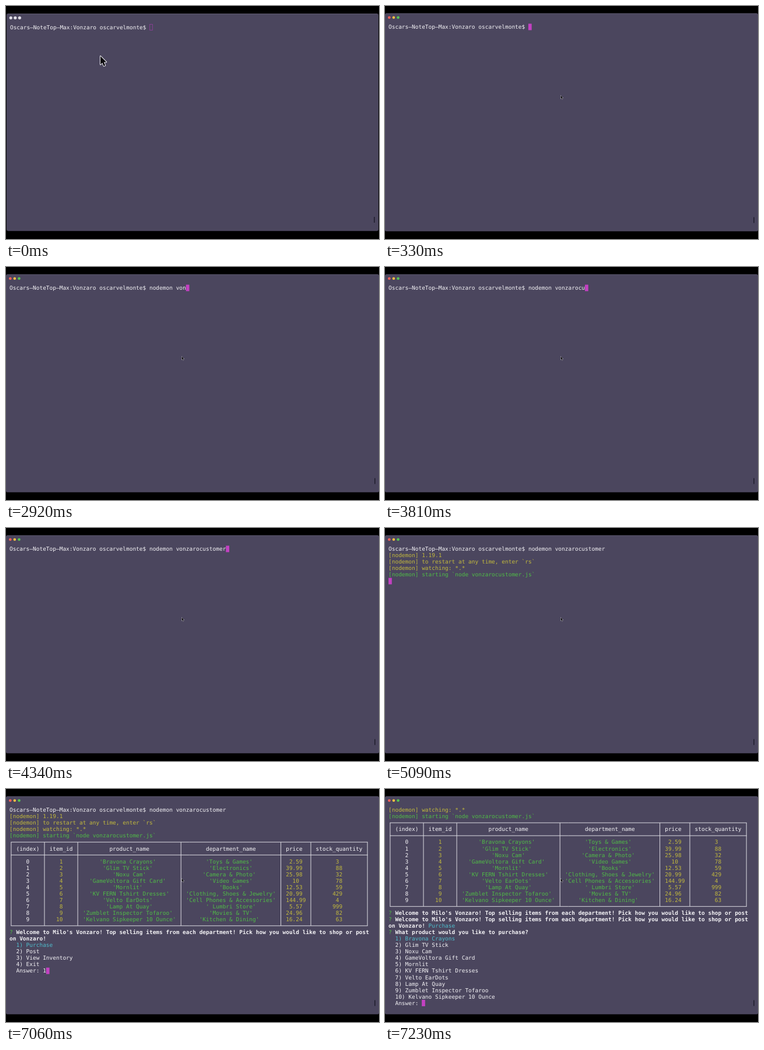
Recreate the animation shown at these times as an HTML page with a canvas. Size 640 by 400 pixels, loop 8000 ms.

```html
<!DOCTYPE html>
<html lang="en">
<head>
<meta charset="utf-8">
<title>Terminal shop</title>
<style>
html, body { margin: 0; width: 100%; height: 100%; overflow: hidden; background: #000; }
canvas { display: block; width: 640px; height: 400px; }
</style>
</head>
<body>
<canvas id="stage" width="640" height="400"></canvas>
<script>
const ctx = document.getElementById('stage').getContext('2d');
const LOOP = 8000;
const FONT = '9.49px "DejaVu Sans Mono", monospace';
const CELL = { x: 6, y: 30.4, w: 5.713, h: 11.05, base: 8.8 };
const C = {
  back: '#4b465e', white: '#f4f3f6', yellow: '#c2b93d', green: '#50bb47',
  cyan: '#4fbccb', cursor: '#c341c2', line: '#dddce3', mark: '#292638'
};

const PROMPT = 'Oscars–NoteTop–Max:Vonzaro oscarvelmonte$ ';
const COMMAND = 'nodemon vonzarocustomer';
// [time, characters typed]
const TYPING = [[870, 2], [1060, 3], [1410, 4], [1590, 5], [1780, 7], [2350, 8],
  [2740, 10], [2920, 11], [3100, 12], [3270, 13], [3450, 15], [3810, 17],
  [3990, 18], [4160, 19], [4340, 23]];

const HEADERS = ['(index)', 'item_id', 'product_name', 'department_name', 'price', 'stock_quantity'];
const PRODUCTS = [
  ['Bravona Crayons', 'Toys & Games', 2.59, 3],
  ['Glim TV Stick', 'Electronics', 39.99, 88],
  ['Noxu Cam', 'Camera & Photo', 25.98, 32],
  ['GameVoltora Gift Card', 'Video Games', 10, 78],
  ['Mornlit', 'Books', 12.53, 59],
  ['KV FERN Tshirt Dresses', 'Clothing, Shoes & Jewelry', 20.99, 429],
  ['Velto EarDots', 'Cell Phones & Accessories', 144.99, 4],
  ['Lamp At Quay', ' Lumbri Store', 5.57, 999],
  ['Zumblet Inspector Tofaroo', 'Movies & TV', 24.96, 82],
  ['Kelvano Sipkeeper 10 Ounce', 'Kitchen & Dining', 16.24, 63]
];
const WELCOME = "Welcome to Milo's Vonzaro! Top selling items from each department! Pick how you would like to shop or post";

const colX = col => CELL.x + col * CELL.w;
const rowY = row => CELL.y + row * CELL.h;

function write(text, col, row, color = C.white, bold = false) {
  ctx.font = (bold ? 'bold ' : '') + FONT;
  ctx.fillStyle = color;
  [...text].forEach((ch, i) => {
    if (ch !== ' ') ctx.fillText(ch, colX(col + i), rowY(row) + CELL.base);
  });
}

function cursor(col, row, hollow) {
  const x = colX(col), y = rowY(row);
  if (hollow) {
    ctx.strokeStyle = '#8d3f98';
    ctx.lineWidth = 0.9;
    ctx.strokeRect(x + 0.5, y + 0.5, CELL.w - 1, CELL.h - 1);
  } else {
    ctx.fillStyle = C.cursor;
    ctx.fillRect(x, y, CELL.w, CELL.h);
  }
}

function stroke(x1, y1, x2, y2) {
  ctx.beginPath();
  ctx.moveTo(x1, y1);
  ctx.lineTo(x2, y2);
  ctx.stroke();
}

function drawTable(top) {
  const rows = PRODUCTS.map(([name, dept, price, stock], i) =>
    [i, i + 1, `'${name}'`, `'${dept}'`, price, stock].map(String));
  const widths = HEADERS.map((h, c) => 2 + Math.max(h.length, ...rows.map(r => r[c].length)));
  const edges = [0];
  widths.forEach(w => edges.push(edges[edges.length - 1] + w + 1));

  const mid = row => rowY(row) + CELL.h / 2;
  const edgeX = col => colX(col + 0.5);
  const bottom = top + rows.length + 3;
  ctx.strokeStyle = C.line;
  ctx.lineWidth = 1;
  edges.forEach(e => stroke(edgeX(e), mid(top), edgeX(e), mid(bottom)));
  [top, top + 2, bottom].forEach(r =>
    stroke(edgeX(0) - 0.5, mid(r), edgeX(edges[edges.length - 1]) + 0.5, mid(r)));

  const center = (text, c, row, color) =>
    write(text, edges[c] + 1 + Math.floor((widths[c] - text.length) / 2), row, color);
  HEADERS.forEach((h, c) => center(h, c, top + 1, C.white));
  const colors = [C.white, C.yellow, C.green, C.green, C.yellow, C.yellow];
  rows.forEach((r, i) => r.forEach((text, c) => center(text, c, top + 3 + i, colors[c])));
}

function question(text, row) {
  write('?', 0, row, C.green);
  write(text, 2, row, C.white, true);
}

function menu(items, row, answer = '') {
  items.forEach((item, i) => write(`${i + 1}) ${item}`, 2, row + i, i ? C.white : C.cyan));
  const last = row + items.length;
  write('Answer: ' + answer, 2, last);
  cursor(10 + answer.length, last);
}

function drawStartup(row) {
  const lines = ['1.19.1', 'to restart at any time, enter `rs`', 'watching: *.*',
    'starting `node vonzarocustomer.js`'];
  lines.forEach((line, i) => {
    if (row + i >= 0) write('[nodemon] ' + line, 0, row + i, i < 3 ? C.yellow : C.green);
  });
}

function drawShell(t) {
  if (t >= 7230) {
    drawStartup(-2);
    drawTable(2);
    question(WELCOME, 16);
    question(WELCOME, 17);
    write('on Vonzaro!', 0, 18, C.white, true);
    write('Purchase', 12, 18, C.cyan);
    question('What product would you like to purchase?', 19);
    menu(PRODUCTS.map(p => p[0]), 20);
    return;
  }
  const typed = TYPING.reduce((n, [at, count]) => t >= at ? count : n, 0);
  write(PROMPT + COMMAND.slice(0, typed), 0, 0);
  if (t < 4890) cursor(PROMPT.length + typed, 0, t < 330);
  else if (t < 5090) cursor(0, 1);
  else {
    drawStartup(1);
    if (t < 5270) return cursor(0, 5);
    drawTable(5);
    question(WELCOME, 19);
    write('on Vonzaro!', 0, 20, C.white, true);
    menu(['Purchase', 'Post', 'View Inventory', 'Exit'], 21, t >= 7060 ? '1' : '');
  }
}

function drawWindow(active) {
  ctx.fillStyle = C.back;
  ctx.beginPath();
  ctx.roundRect(0, 12.5, 640, 374.3, 2.5);
  ctx.fill();
  ctx.fillStyle = 'rgba(255,255,255,0.13)';
  ctx.fillRect(2, 12.6, 636, 0.8);
  const lights = active ? ['#f9605a', '#f5bd43', '#55c653'] : Array(3).fill('#dedce4');
  lights.forEach((color, i) => {
    ctx.fillStyle = color;
    ctx.beginPath();
    ctx.arc(7.3 + i * 7.6, 19.8, active ? 2.3 : 2.6, 0, Math.PI * 2);
    ctx.fill();
  });
  ctx.fillStyle = C.mark;
  ctx.fillRect(632, 362.5, 2, 10);
}

function drawPointer(x, y, size) {
  ctx.save();
  ctx.translate(x, y);
  ctx.scale(size, size);
  ctx.beginPath();
  [[0, 0], [0, 14.5], [3.3, 11.5], [5.8, 17.2], [8.3, 16.1], [5.9, 10.5], [10.2, 10.2]]
    .forEach(([px, py]) => ctx.lineTo(px, py));
  ctx.closePath();
  ctx.lineJoin = 'round';
  ctx.lineWidth = 2;
  ctx.strokeStyle = '#eeedf2';
  ctx.stroke();
  ctx.fillStyle = '#0b0a0e';
  ctx.fill();
  ctx.restore();
}

function draw(t) {
  ctx.fillStyle = '#000';
  ctx.fillRect(0, 0, 640, 400);
  ctx.save();
  if (t < 130) {
    const zoom = t < 100 ? 0.997 : 0.9985;
    ctx.translate(320, 200);
    ctx.scale(zoom, zoom);
    ctx.translate(-320, -200);
  }
  drawWindow(t >= 330);
  drawShell(t);
  ctx.restore();
  if (t < 100) drawPointer(162, 86, 1);
  else if (t < 130) drawPointer(232, 120, 0.7);
  else drawPointer(301.6, 153.6, 0.38);
}

ctx.textRendering = 'geometricPrecision';
const start = performance.now();
function tick() {
  draw((performance.now() - start) % LOOP);
  requestAnimationFrame(tick);
}
tick();
</script>
</body>
</html>
```
